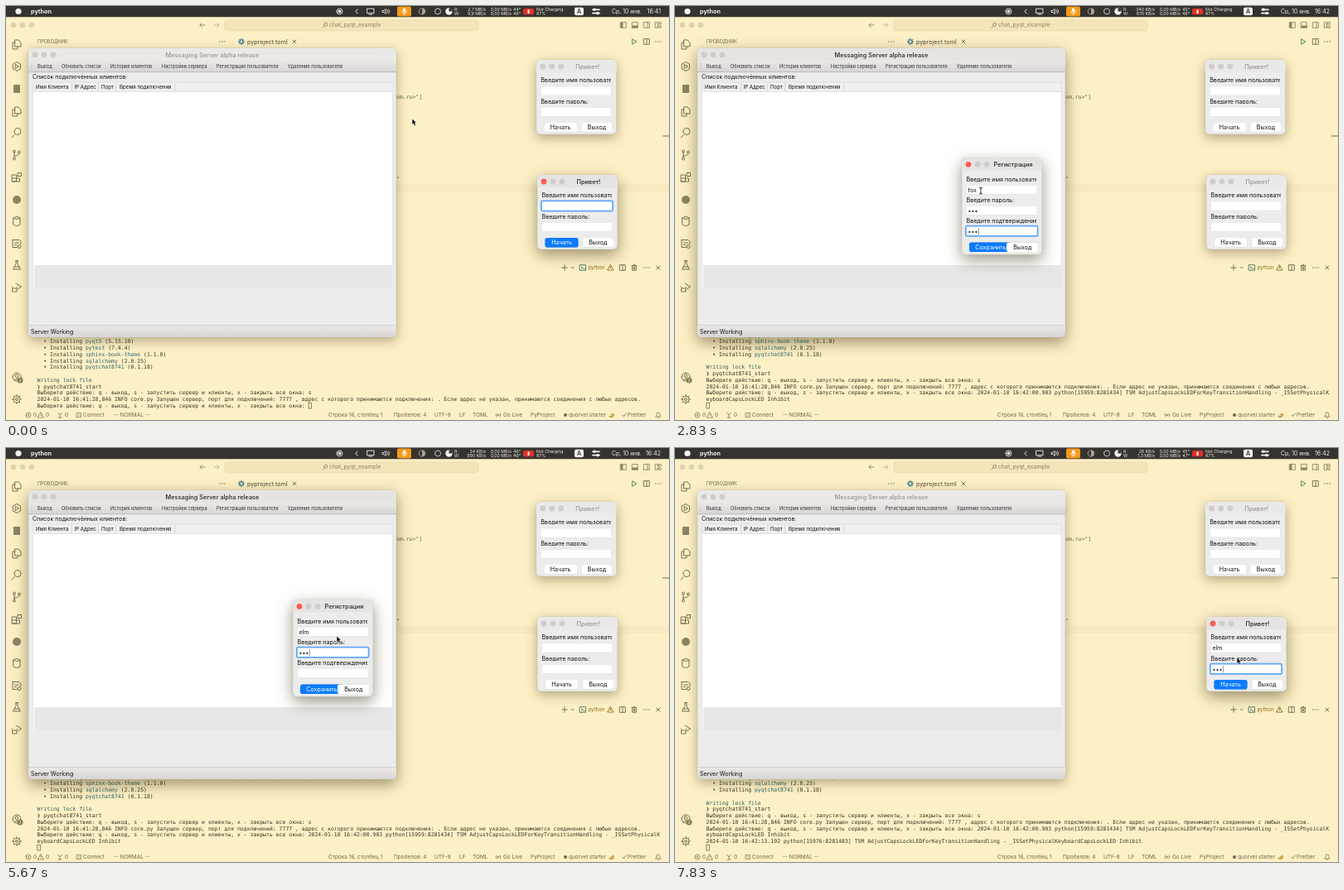
Recreate the animation shown at these times as an HTML page. Size 800 by 500 pixels, loop 8000 ms.

```html
<!DOCTYPE html>
<html lang="ru">
<head>
<meta charset="utf-8">
<title>Messaging Server</title>
<style>
html, body { margin: 0; width: 100%; height: 100%; overflow: hidden; background: #fdf0c6; }
svg { display: block; }
#stage { width: 800px; height: 500px; }
text { white-space: pre; font-family: Inter, "Noto Sans", sans-serif; }
text.mono { font-family: "DejaVu Sans Mono", "Noto Sans Mono", monospace; }
.on { filter: drop-shadow(0 6px 9px rgba(60, 48, 15, .5)); }
.off { filter: drop-shadow(0 4px 7px rgba(60, 48, 15, .38)); }
.btn { filter: drop-shadow(0 .4px .4px rgba(0, 0, 0, .3)); }
</style>
</head>
<body>
<svg id="stage" viewBox="0 0 800 500">
  <defs>
    <linearGradient id="bar" x2="0" y2="1"><stop stop-color="#ebe8e6"/><stop offset="1" stop-color="#d8d6d5"/></linearGradient>
    <linearGradient id="bubble" x2="0" y2="1"><stop stop-color="#fff"/><stop offset="1" stop-color="#dcdcdc"/></linearGradient>
  </defs>
  <g id="desk"></g>
  <g id="live"></g>
</svg>
<script>
const STEP = 500 / 3, STEPS = 48;
const USERS = ["fox", "elm"];
const INK = "#6f6749", SOFT = "#8d8463", BLUE = "#0a7bff", MENU = "#36322e";

// y is the vertical middle of the line
const text = (x, y, s, size = 7, o = {}) =>
  `<text x="${x}" y="${y + size * .36}" font-size="${size}" fill="${o.fill || "#111"}"` +
  ` font-weight="${o.weight || 400}" text-anchor="${o.at || "start"}" class="${o.cls || ""}">${s}</text>`;
const rect = (x, y, w, h, fill, r = 0, extra = "") =>
  `<rect x="${x}" y="${y}" width="${w}" height="${h}" rx="${r}" fill="${fill}" ${extra}/>`;
const dot = (x, y, r, fill) => `<circle cx="${x}" cy="${y}" r="${r}" fill="${fill}"/>`;
const line = (d, color = SOFT, w = .9) =>
  `<path d="${d}" fill="none" stroke="${color}" stroke-width="${w}" stroke-linecap="round" stroke-linejoin="round"/>`;
const icon = (x, y, d, color, w) => `<g transform="translate(${x} ${y})">${line(d, color, w)}</g>`;
const clip = (x, y, w, h, s) =>
  `<svg x="${x}" y="${y}" width="${w}" height="${h}" viewBox="${x} ${y} ${w} ${h}">${s}</svg>`;
const ring = r => `M${-r} 0a${r} ${r} 0 1 0 ${2 * r} 0a${r} ${r} 0 1 0 ${-2 * r} 0`;
const dots3 = (x, y) => [-3, 0, 3].map(d => dot(x + d, y, .7, INK)).join("");
const CROSS = "M-2-2L2 2M2-2L-2 2", PANES = "M-3.3-3.3h6.6v6.6h-6.6zM0-3.3v6.6", TRI = "M0-3.2L3.5 3H-3.5zM0-1v1.6";

const at = (table, k) => table.filter(row => row[0] <= k).pop();

function menuBar(k) {
  const w = "#f4f1ea", small = { fill: w, at: "end" };
  const [, read, write, t1, t2] = at(STATS, k);
  const row = (y, name, v, temp) => text(541, y, name, 5, { fill: w }) + text(579, y, v, 5.2, small) +
    text(610, y, "0,00 MB/s", 5.2, small) + text(621, y, temp, 5.2, small);
  return rect(0, 0, 800, 13.3, MENU) + dot(15, 6.5, 3.6, "#f2f2f2") +
    text(30, 6.5, "python", 7.2, { fill: w, weight: 700 }) +
    dot(402.5, 6.5, 2, w) + icon(402.5, 6.5, ring(3.5), w) +
    icon(423, 6.5, "M1.2-2.5L-1 0L1.2 2.5", w, 1) +
    icon(440, 6.5, "M-4-3.3h8v5.5h-8zM-2 3.6h4", w) +
    icon(459, 6.5, "M-4.5-1h1.5L-1-3v6L-3 1h-1.5zM1-1.5q1 1.5 0 3M2.7-2.6q2 2.6 0 5.2", w) +
    rect(472, .5, 17, 12, "#f59a1b", 2) + rect(479, 2.5, 3.4, 5, "#fff", 1.7) +
    icon(480.7, 6, "M-3 0q0 3 3 3t3-3M0 3v1.8", "#fff", .8) +
    icon(502, 6.5, ring(3.7), "#aaa599") + `<path d="M502 2.8a3.7 3.7 0 0 1 0 7.4z" fill="#aaa599"/>` +
    icon(521, 6.5, ring(3.5), "#d8d3c8") + dot(534.5, 6.5, 4.2, w) +
    `<path d="M534.5 6.5V2.3a4.2 4.2 0 0 1 4.2 4.2z" fill="${MENU}"/>` +
    row(4.2, "R:", read, t1) + row(9.4, "W:", write, t2) +
    rect(624, 3, 13, 7.5, "#e03128", 2) + rect(629.5, 4.5, 2, 4.5, "#fff") +
    text(640, 4.2, "Not Charging", 5.2, { fill: w }) + text(640, 9.4, "87%", 5.2, { fill: w }) +
    rect(686, 1.8, 11, 9.5, w, 2) + text(691.5, 6.6, "A", 7, { at: "middle", fill: MENU, weight: 600 }) +
    icon(712, 6.5, "M-4-2.2h8M-4 2.2h8", w, 1.7) + dot(710, 4.3, 1.8, w) + dot(714, 8.7, 1.8, w) +
    text(731, 6.5, "Ср, 10 янв.", 6.9, { fill: w }) +
    text(790, 6.5, k < 6 ? "16:41" : "16:42", 7, small);
}

function desk() {
  const sheet = "M-2-5h4l3 3v5h-7zM-2-2h-3v8h6v-3";
  const side = [
    [46, sheet], [73, "M-4.5-3L0-5.5L4.5-3V3L0 5.5L-4.5 3zM-1.5-2.4L2.5 0L-1.5 2.4z"],
    [127, sheet], [153, "M-2.5 2.5L-6 6M-3-1.5a4 4 0 1 0 8 0a4 4 0 1 0-8 0"],
    [180, "M-3-3v6M-3 1q6 0 6-3M-4.5-4.5a1.5 1.5 0 1 0 3 0a1.5 1.5 0 1 0-3 0M-4.5 4.5a1.5 1.5 0 1 0 3 0a1.5 1.5 0 1 0-3 0M1.5-3.5a1.5 1.5 0 1 0 3 0a1.5 1.5 0 1 0-3 0"],
    [207, "M-5.5-3h5v8h-5zM-5.5 1h9v4h-9M1.5-5.5h4v4h-4z"],
    [260, "M-4-4q4-3 8 0v8q-4 3-8 0zM-4-4q4 3 8 0"], [287, "M-5-4.5h8l2 2v3M-5-4.5v9h5M-2.5-1h5M-2.5 1.5h2M1 3.5a2 2 0 1 0 4 0a2 2 0 1 0-4 0"],
    [313, "M-1.5-5.5h3M-1-5.5v4L-4.5 5h9L1-1.5v-4M-3 2h6"], [340, "M-1-5L5.5-1L1 2M-5 1h5v4h-5zM-5 0l-1-1M0 0l1-1"],
    [448, ring(5) + "M-3 4q3-4 6 0M-1.8-1.3a1.8 1.8 0 1 0 3.6 0a1.8 1.8 0 1 0-3.6 0"],
    [475, ring(4) + "M-1.5 0a1.5 1.5 0 1 0 3 0a1.5 1.5 0 1 0-3 0M0-5.5v1.5M0 4v1.5M-5.5 0H-4M4 0h1.5M-4-4l1 1M3 3l1 1M4-4l-1 1M-3 3l-1 1"]
  ];
  const status = [
    [33, "0"], [48, "0"], [71, "0"], [93, "Connect"], [130, "-- NORMAL --"], [389, "Строка 16, столбец 1"],
    [468, "Пробелов: 4"], [517, "UTF-8"], [547, "LF"], [563, "TOML"], [600, "Go Live"], [633, "PyProject"],
    [679, "quorvel starter"], [750, "Prettier"]
  ];
  const head = { fill: INK };
  return rect(0, 0, 800, 500, "#fdf0c6") + rect(471, 215, 329, 9, "#f8eac0") +
    [9, 20, 31].map(x => dot(x, 23, 3.3, "#ddd2ac")).join("") +
    icon(237, 23, "M3 0H-3M-.7-2.3L-3 0L-.7 2.3") + icon(254, 23, "M-3 0H3M.7-2.3L3 0L.7 2.3", "#c0b58e") +
    rect(264, 17, 306, 13, "#f3e5b9", 3, 'stroke="#e2d5aa" stroke-width=".6"') +
    icon(385, 23, "M-1 1L-3 3M-1.2-.8a2 2 0 1 0 4 0a2 2 0 1 0-4 0") + text(390, 23, "chat_pyqt_example", 6.9, { fill: SOFT }) +
    icon(745, 23, "M-3.3-3.3h6.6v6.6h-6.6zM-1-3.3v6.6") + rect(741.7, 19.7, 2.3, 6.6, SOFT) +
    icon(759, 23, "M-3.3-3.3h6.6v6.6h-6.6zM-3.3 1h6.6") + rect(755.7, 24, 6.6, 2.3, SOFT) +
    icon(773, 23, "M-3.3-3.3h6.6v6.6h-6.6zM1-3.3v6.6") + icon(787, 23, "M-3.3-3.3h2.6v6.6h-2.6zM1-3.3h2.3v2.3H1zM1 1h2.3v2.3H1z") +
    text(38, 43, "ПРОВОДНИК", 5.6, head) + dots3(261, 43) +
    icon(284, 43, ring(2.1) + "M0-3.5v1M0 2.5v1M-3.5 0h1M2.5 0h1M-2.4-2.4l.7.7M1.7 1.7l.7.7M2.4-2.4l-.7.7M-1.7 1.7l-.7.7", "#4a8193", 1.3) +
    text(291, 43, "pyproject.toml", 7.2, { fill: "#4d4733" }) + icon(348, 43, CROSS, INK) +
    icon(758, 43, "M-2-3L3 0L-2 3z", "#4c7b4b") + icon(773, 43, PANES, INK) + dots3(787, 43) +
    rect(792, 156.5, 8, 1, "#78704f") +
    text(471, 110, "om.ru&gt;\"]", 6.47, { cls: "mono", fill: "#5c6647" }) +
    text(471, 209, "\"", 6.47, { cls: "mono", fill: "#5c6647" }) +
    side.map(([y, d]) => icon(13, y, d, INK, .95)).join("") + rect(9, 95, 8, 10, SOFT, 1) + dot(13, 234, 5, SOFT) +
    dot(17, 452, 3.5, "#8a7b45") + text(17, 452, "2", 5, { at: "middle", fill: "#fff" }) +
    icon(674, 316, "M-3.3 0h6.6M0-3.3v6.6", INK) + icon(683.5, 316, "M-1.5-.7L0 .8L1.5-.7", INK) +
    icon(696, 316, "M-3.5-3.3h7v6.6h-7zM-1.8-1.3L0 0L-1.8 1.3M.7 1.5h1.5", "#4a775f") +
    text(702.5, 316, "python", 6.1, { fill: "#8f6a16" }) + icon(729.5, 316, TRI, "#8f6a16") + icon(744, 316, PANES, INK) +
    icon(758, 316, "M-3-2.3h6M-1-2.3v-1h2v1M-2.3-2.3v5.6h4.6v-5.6M-.7-.7v2.6M.7-.7v2.6", INK) + dots3(773, 316) + icon(787, 316, CROSS, INK) +
    status.map(([x, s]) => text(x, 494, s, 6.5, head)).join("") +
    icon(27, 494, ring(3) + "M-1-1L1 1M1-1L-1 1", INK, .7) + icon(42, 494, TRI, INK, .7) +
    icon(65, 494, "M0 3V-1M-2.5-2.5L0-.5L2.5-2.5M-2 3h4", INK, .7) + icon(88, 494, "M-2.5-2.5h5v5h-5zM-1 0h2", INK, .7) +
    icon(594, 494, ring(1) + "M-2.3-2q-1.5 2 0 4M2.3-2q1.5 2 0 4", INK, .7) + dot(675, 494, 2, INK) +
    icon(731, 494, "M-3 1.5q3 2 5.5-1.5M-1 0l3-1.5", "#b48a2b", 1.3) + icon(746, 494, "M-2 0L-.5 1.8L2.3-2", INK, .8) +
    icon(787, 494, "M-3 2h6q-1.2-1-1.2-3T0-3.3T-1.8-1T-3 2M-.7 3.2h1.4", INK, .7);
}

const PROMPT = "Выберите действие: q - выход, s - запустить сервер и клиенты, x - закрыть все окна: ";
const TSM = " TSM AdjustCapsLockLEDForKeyTransitionHandling - _ISSetPhysicalK";
const pkg = (name, v) => `  • Installing <tspan fill="#2b6468">${name}</tspan> (${v})`;
const INTRO = [
  pkg("pyqt5", "5.15.10"), pkg("pytest", "7.4.4"), pkg("sphinx-book-theme", "1.1.0"),
  pkg("sqlalchemy", "2.0.25"), pkg("pyqtchat8741", "0.1.18"), "",
  '<tspan fill="#2f605c">Writing lock file</tspan>', "❯ pyqtchat8741_start", PROMPT + "s",
  "2024-01-10 16:41:28,846 INFO core.py Запущен сервер, порт для подключений: 7777 , адрес с которого принимаются подключения: . Если адрес не указан, принимаются соединения с любых адресов."
];

function terminal(k) {
  const lines = [...INTRO];
  if (k < 8) lines.push(PROMPT);
  else lines.push(PROMPT + "2024-01-10 16:42:00.903 python[15959:8281434]" + TSM, "eyboardCapsLockLED Inhibit");
  if (k >= 47) lines.push("2024-01-10 16:42:13.192 python[15976:8281483]" + TSM + "eyboardCapsLockLED Inhibit");
  if (k >= 8) lines.push("");
  const top = 482.5 - (lines.length - 1) * 7.75;
  const cx = 37.5 + (k < 8 ? PROMPT.length * 3.895 : 0);
  return lines.map((s, i) => text(37.5, top + i * 7.75, s, 6.47, { cls: "mono", fill: "#343522" })).join("") +
    rect(cx + .4, 479.2, 3.4, 6.8, "none", 0, 'stroke="#5b553d" stroke-width=".7"');
}

// Shell shared by every window
function frame(x, y, w, h, title, active, body, red = active) {
  return rect(x, y, w, h, "#ececec", 5, `class="${active ? "on" : "off"}" stroke="#b9b4a6" stroke-width=".5"`) +
    `<path d="M${x} ${y + 15}v-10a5 5 0 0 1 5-5h${w - 10}a5 5 0 0 1 5 5v10z" fill="${active ? "#e6e4e2" : "#ebe9e8"}"/>` +
    [8, 19, 30].map((d, i) => dot(x + d, y + 8, 3.4, red && !i ? "#fc5b57" : "#cfcdcb")).join("") +
    text(x + w / 2 + (w < 120 ? 13.5 : 0), y + 8, title, 7.3, { at: "middle", weight: 600, fill: active ? "#3c3a38" : "#a09e9c" }) + body;
}

function field(x, y, w, value, focus, caret) {
  const shown = value + (caret ? `<tspan font-weight="300">|</tspan>` : "");
  return (focus ? rect(x - .6, y - .6, w + 1.2, 12.2, "#fff", 1.5, 'stroke="#62a8f4" stroke-width="1.8"')
    : rect(x, y, w, 11, "#fff", 0, 'stroke="#dedede" stroke-width=".5"')) + text(x + 2, y + 5.7, shown, 7);
}

const button = (x, y, w, s, hot) => rect(x, y, w, 11.5, hot ? BLUE : "#fff", 2.8, 'class="btn"') +
  text(x + w / 2, y + 5.8, s, 7.1, { at: "middle", fill: hot ? "#fff" : "#111" });

const label = (x, y, s) => clip(x, y - 4.5, 84.5, 7.8, text(x, y, s, 7.15));

function client(x, y, s = {}) {
  return frame(x, y, 97, 90, "Привет!", s.active,
    label(x + 5.5, y + 24, "Введите имя пользователя:") + field(x + 5.5, y + 32, 85, s.name || "", s.focus === 0, s.focus === 0 && s.name) +
    label(x + 5.5, y + 50, "Введите пароль:") + field(x + 5.5, y + 57.3, 85, s.pass || "", s.focus === 1, s.focus === 1) +
    button(x + 9.5, y + 76, 40, "Начать", s.active) + button(x + 54.5, y + 76, 37.5, "Выход"));
}

function server(active) {
  const tools = [[38, "Выход"], [67, "Обновить список"], [126, "История клиентов"], [188, "Настройки сервера"],
    [254, "Регистрация пользователя"], [340, "Удаление пользователя"]];
  const cols = [[36, "Имя Клиента", 79], [82.5, "IP Адрес", 111.5], [115, "Порт", 132.5], [137, "Время подключения", 203.5]];
  return frame(27, 51, 444, 349, "Messaging Server alpha release", active,
    rect(27, 66, 444, 13.5, "url(#bar)") + rect(27, 79.3, 444, .9, "#b4b2b0") +
    [70, 73, 76].map(y => dot(31, y, .5, "#a5a3a1")).join("") +
    tools.map(([x, s]) => text(x, 73, s, 5.65, { fill: "#30302f" })).join("") +
    text(32, 85, "Список подключённых клиентов:", 7) +
    rect(33, 92, 433, 222, "#f0f0f0", 0, 'stroke="#d0d0d0" stroke-width=".5"') +
    cols.map(([x, s, edge]) => text(x, 97.7, s, 6.2) + rect(edge, 93, .6, 10, "#c2c2c2")).join("") +
    rect(33, 103.5, 433, .5, "#d4d4d4") + rect(33, 104, 433, 209, "#fff") +
    rect(33, 313.5, 433, 27.5, "#e7e7e7") + rect(33, 313.5, 1.5, 27.5, "#f5f5f5") +
    `<path d="M27 385.5h444v9.5a5 5 0 0 1-5 5h-434a5 5 0 0 1-5-5z" fill="url(#bar)"/>` + rect(27, 385, 444, .6, "#c5c3c2") +
    text(30, 393, "Server Working", 7), false);
}

function register(s, active) {
  const labels = ["Введите имя пользователя:", "Введите пароль:", "Введите подтверждение пароля:"];
  return frame(346, 183.3, 97, 117, "Регистрация", active,
    labels.map((t, i) => label(351.5, 209.5 + i * 25, t) +
      field(351.5, 216.3 + i * 25, 85.5, s.values[i], active && s.focus === i, active && s.focus === i)).join("") +
    button(355, 285.5, 52, "Сохранить", active) + button(400, 285.5, 38.5, "Выход"));
}

function message(pressed) {
  return frame(274, 190.5, 230, 90.5, "", true,
    `<path class="btn" d="M305 217c9 0 16 6 16 13.5s-5 11-9 12.5q3 3 7 4q-8 0-12-3.500c-10 0-18-5-18-13s7-13.500 16-13.500z" fill="url(#bubble)" stroke="#c6c6c6" stroke-width=".5"/>` +
    `<path d="M302.8 222.5h4.4l-1.2 12h-2z" fill="#4b4b4b"/>` + dot(305, 238, 2, "#4b4b4b") +
    text(331, 218.7, "Пользователь успешно зарегистрирован.", 7.3, { weight: 700 }) +
    rect(448.5, 254, 39, 13, BLUE, 3, 'stroke="#8cc0f7" stroke-width="1.6"') +
    text(468, 260.6, "OK", 7.2, { at: "middle", fill: pressed ? "#b9dcff" : "#0b2a57" }));
}

// step, read, write, temperatures
const STATS = [
  [0, "2,7 MB/s", "9,9 MB/s", "44°", "46°"], [3, "1,1 MB/s", "2,4 MB/s", "44°", "46°"], [6, "210 KB/s", "980 KB/s", "44°", "46°"],
  [12, "96 KB/s", "1,2 MB/s", "45°", "46°"], [17, "340 KB/s", "870 KB/s", "45°", "46°"], [21, "812 KB/s", "961 KB/s", "45°", "46°"],
  [28, "24 KB/s", "902 KB/s", "46°", "46°"], [30, "24 KB/s", "990 KB/s", "46°", "46°"], [37, "33 KB/s", "735 KB/s", "45°", "47°"],
  [43, "28 KB/s", "1,3 MB/s", "45°", "47°"]
];

const PATH = [
  [0, 490, 136], [3, 305, 78], [4, 291, 70], [5, 291, 70], [7, 369, 223], [17, 369, 223], [19, 380, 290], [20, 395, 285],
  [21, 470, 258], [23, 470, 258], [26, 291, 68], [28, 291, 68], [31, 396, 212], [32, 396, 212], [33, 399, 227], [36, 399, 227],
  [38, 380, 290], [39, 385, 288], [41, 455, 263], [42, 459, 261], [44, 688, 242], [46, 688, 242], [47, 678, 253]
];

function pointer(k) {
  const i = PATH.findLastIndex(p => p[0] <= k);
  const a = PATH[i], b = PATH[i + 1] || a, f = b === a ? 0 : (k - a[0]) / (b[0] - a[0]);
  const x = a[1] + (b[1] - a[1]) * f, y = a[2] + (b[2] - a[2]) * f;
  if (k >= 7 && k <= 17) return icon(x, y, "M-1.5-4q1.5 0 1.5 1.2v5.6q0 1.2-1.5 1.2M1.5-4q-1.5 0-1.5 1.2M0 2.8q0 1.2 1.5 1.2", "#111", .9);
  return `<path transform="translate(${x} ${y})" d="M0 0v7.5l1.7-1.6l1.3 2.9l1.5-.7l-1.3-2.8h2.3z" fill="#000" stroke="#fff" stroke-width=".6"/>`;
}

// starts: steps at which name, password and confirmation begin
function form(user, starts, k) {
  const typed = (s, from) => s.slice(0, Math.max(0, k - from + 1));
  return {
    values: [user, "•••", "•••"].map((s, i) => typed(s, starts[i])),
    focus: k >= starts[2] ? 2 : k >= starts[1] ? 1 : 0
  };
}

function draw(k) {
  const late = k >= 44, first = k < 4;
  const asking = (k >= 20 && k < 23) || (k >= 39 && k < 42);
  const signing = (k >= 5 && k < 23) || (k >= 28 && k < 42);
  const data = k < 28 ? form(USERS[0], [7, 11, 15], k) : form(USERS[1], [29, 32, 35], k);
  const login = late ? { active: true, focus: k < 47 ? 0 : 1, name: USERS[1].slice(0, k - 43), pass: k < 47 ? "" : "•••" }
    : { active: first, focus: first ? 0 : -1 };
  return menuBar(k) + terminal(k) + server(!first && !late) + client(639.7, 65) + client(641, 204, login) +
    (signing ? register(data, !asking) : "") + (asking ? message(k === 22) : "") + pointer(k);
}

document.getElementById("desk").innerHTML = desk();
const live = document.getElementById("live"), start = performance.now();
let last = -1;
function tick(now) {
  // The small lead keeps steps rounded to 10 ms on time
  const k = Math.floor((Math.max(0, now - start) + 5) / STEP) % STEPS;
  if (k !== last) live.innerHTML = draw(last = k);
  requestAnimationFrame(tick);
}
tick(start);
</script>
</body>
</html>
```
